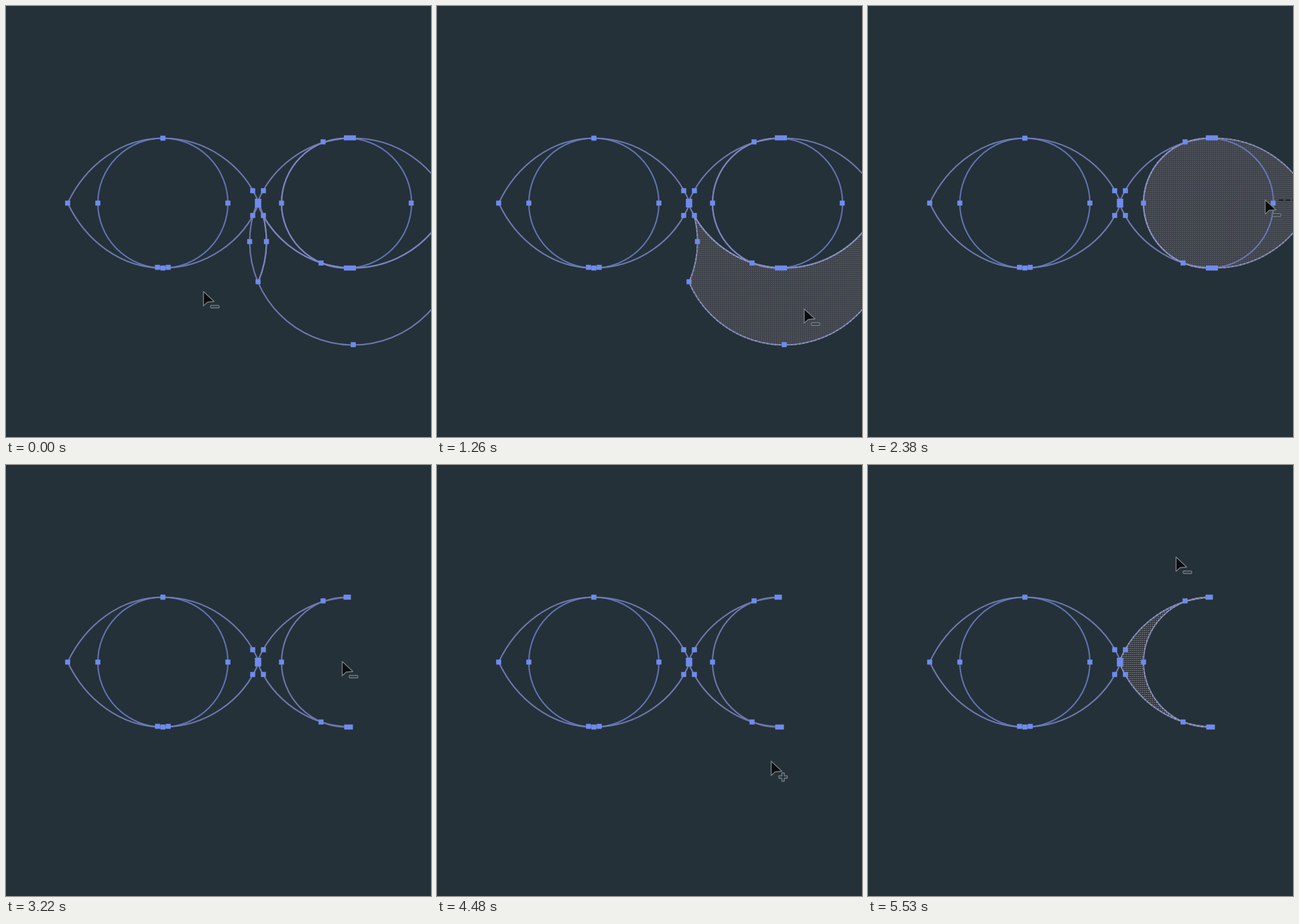
An HTML page with a canvas for the animation above (5740 ms loop, 634 by 644 pixels).

```html
<!DOCTYPE html>
<html lang="en">
<head>
<meta charset="utf-8">
<title>Shape builder</title>
<style>
  html, body { margin: 0; width: 100%; height: 100%; overflow: hidden; background: #243138; }
  canvas { display: block; }
</style>
</head>
<body>
<canvas id="stage" width="634" height="644"></canvas>
<script>
const ctx = document.getElementById('stage').getContext('2d');
const LOOP = 5740, STEP = 70, LAST = 5530;
const PI = Math.PI, HALF = PI / 2;

// Every outline is built from circles around one axis
const AXIS = 294.5, JOIN = 376, R = 154.5, HEIGHT = 97;
const LIFT = R - HEIGHT;
const TIP = Math.asin(LIFT / R), LOW = TIP + 0.02;
const circle = (x, y, r) => ({ x, y, r });
const leftUp = circle(234, AXIS + LIFT, R), leftDown = circle(234, AXIS - LIFT, R);
const rightUp = circle(518, AXIS + LIFT, R), rightDown = circle(518, AXIS - LIFT, R);
const leftDisc = circle(234, AXIS, HEIGHT), rightDisc = circle(508, AXIS, HEIGHT);

// Joins arcs [circle, from angle, to angle, counterclockwise]
function shape(...arcs) {
  const p = new Path2D();
  for (const [c, from, to, ccw] of arcs) p.arc(c.x, c.y, c.r, from, to, !!ccw);
  return p;
}

// The left corner is a little sharper than an arc
const eye = shape([leftUp, -HALF, -TIP], [leftDown, TIP, HALF]);
for (const side of [-1, 1]) {
  const edge = AXIS + side * HEIGHT;
  eye.moveTo(92, AXIS);
  eye.bezierCurveTo(118, AXIS + side * 55, 170, edge, 234, edge);
}
const iris = shape([leftDisc, 0, 2 * PI]);
const crescent = shape(
  [rightUp, PI + TIP, 3 * HALF - 0.04],
  [rightDisc, -HALF, HALF, true],
  [rightDown, HALF + 0.03, PI - TIP]);
const rightEye = shape(
  [rightDisc, HALF, 3 * HALF],
  [rightUp, -HALF, -TIP],
  [rightDown, TIP, HALF]);
const rightIris = shape([rightDisc, -HALF, HALF]);
const lens = shape([rightUp, PI - LOW, PI + TIP], [leftUp, -TIP, LOW]);
const bowl = shape(
  [rightUp, LOW, PI - LOW],
  [leftUp, LOW, -0.25, true],
  [rightDown, PI - 0.515, TIP, true]);

function mesh(base, dot) {
  const tile = document.createElement('canvas');
  tile.width = tile.height = 3;
  const g = tile.getContext('2d');
  g.fillStyle = base;
  g.fillRect(0, 0, 3, 3);
  g.fillStyle = dot;
  g.fillRect(0, 0, 2, 2);
  return ctx.createPattern(tile, 'repeat');
}
const wideMesh = mesh('#3a3e45', '#52555e');
const thinMesh = mesh('#2a2f34', '#65696e');

// Pointer stops: time, x, y
const stops = [
  [0, 294, 426], [700, 352, 372], [840, 399, 368], [1610, 660, 516],
  [2030, 660, 290], [2380, 592, 289], [2800, 395, 300], [3220, 501, 293],
  [3850, 517, 340], [4480, 498, 442], [5180, 398, 290], [LAST, 459, 137]
];

function pointerAt(t) {
  const i = Math.max(1, stops.findIndex(s => s[0] >= t));
  const [t0, x0, y0] = stops[i - 1], [t1, x1, y1] = stops[i];
  const k = (t - t0) / (t1 - t0), e = k * k * (3 - 2 * k);
  return [x0 + (x1 - x0) * e, y0 + (y1 - y0) * e];
}

function stroke(color, width, dash, ...paths) {
  ctx.strokeStyle = color;
  ctx.lineWidth = width;
  ctx.setLineDash(dash);
  paths.forEach(p => ctx.stroke(p));
  ctx.setLineDash([]);
}

function anchor(x, y, w = 7.5, h = 7.5) {
  ctx.fillStyle = '#6f8bed';
  ctx.fillRect(x - w / 2, y - h / 2, w, h);
}

function trail(x0, x1, y) {
  const p = new Path2D();
  p.moveTo(x0, y);
  p.lineTo(x1, y);
  stroke('#0b0e11', 1.6, [7, 3], p);
}

const arrow = new Path2D('M0.5 0.5V22L6.5 16.5L16.5 15.5Z');
const minus = new Path2D('M12 21.5H23Q24 21.5 24 23.3T23 25H12Q11 25 11 23.3T12 21.5Z');
const plus = new Path2D('M16.5 18H20V22.5H24.5V26H20V30.5H16.5V26H12V22.5H16.5Z');

function pointer(x, y, badge) {
  ctx.save();
  ctx.translate(x, y);
  ctx.lineJoin = 'round';
  ctx.fillStyle = '#0a0d10';
  ctx.fill(arrow);
  ctx.fillStyle = '#243138';
  ctx.fill(badge);
  stroke('#777d82', 1.4, [], arrow, badge);
  ctx.restore();
}

function drawAnchors(hasLens, hasBowl, hasRight) {
  const top = AXIS - HEIGHT, bottom = AXIS + HEIGHT;
  for (const x of [92, 137, 331, 411]) anchor(x, AXIS);
  for (const side of [-1, 1]) {
    for (const x of [JOIN - 8, JOIN + 8]) anchor(x, AXIS + side * 18.5);
    anchor(234 + side * 8, bottom - 1);
  }
  anchor(JOIN, AXIS, 9.5, 13);
  anchor(234, top);
  anchor(234, bottom);
  anchor(473, 203);
  anchor(470, 384);
  if (hasRight) {
    anchor(513, top - 0.5, 18);
    anchor(513, bottom, 18);
    anchor(604.5, AXIS);
  } else {
    anchor(509, top, 11);
    anchor(511, bottom, 13);
  }
  if (hasBowl) {
    anchor(JOIN, 412);
    anchor(518, 506);
    anchor(JOIN + 12.5, 352);
  }
  if (hasLens) anchor(JOIN - 12.5, 352);
}

function draw(t) {
  const during = (a, b) => t >= a && t < b;
  const hasLens = t < 980, hasBowl = t < 1400, hasRight = t < 2520;
  let hot = null, fill = thinMesh;
  if (during(770, 980)) hot = lens;
  else if (during(1120, 1400)) { hot = bowl; fill = wideMesh; }
  else if (during(2170, 2520)) { hot = rightEye; fill = wideMesh; }
  else if (during(2730, 3010) || t >= 5180) hot = crescent;

  ctx.fillStyle = '#243138';
  ctx.fillRect(0, 0, 634, 644);
  if (hot) {
    ctx.fillStyle = fill;
    ctx.fill(hot);
  }

  const outer = [eye, crescent], inner = [iris];
  if (hasRight) {
    outer.push(rightEye);
    inner.push(rightIris);
  }
  if (hasBowl) outer.push(bowl);
  if (hasLens) outer.push(lens);
  stroke('rgba(126, 135, 198, 0.82)', 2.1, [], ...outer);
  stroke('rgba(112, 128, 206, 0.82)', 2.1, [], ...inner);
  if (hot) stroke('#9a9daa', 1.3, [3, 3], hot);

  drawAnchors(hasLens, hasBowl, hasRight);
  const [x, y] = pointerAt(t);
  if (during(770, 910)) trail(364, 370, 371);
  if (during(2170, 2450)) trail(x + 21, 640, 290);
  pointer(x, y, during(3850, 4690) ? plus : minus);
}

let start;
function tick(now) {
  start ??= now;
  const t = Math.max(0, now - start) % LOOP;
  draw(Math.min(Math.floor(t / STEP) * STEP, LAST));
  requestAnimationFrame(tick);
}
draw(0);
requestAnimationFrame(tick);
</script>
</body>
</html>
```
